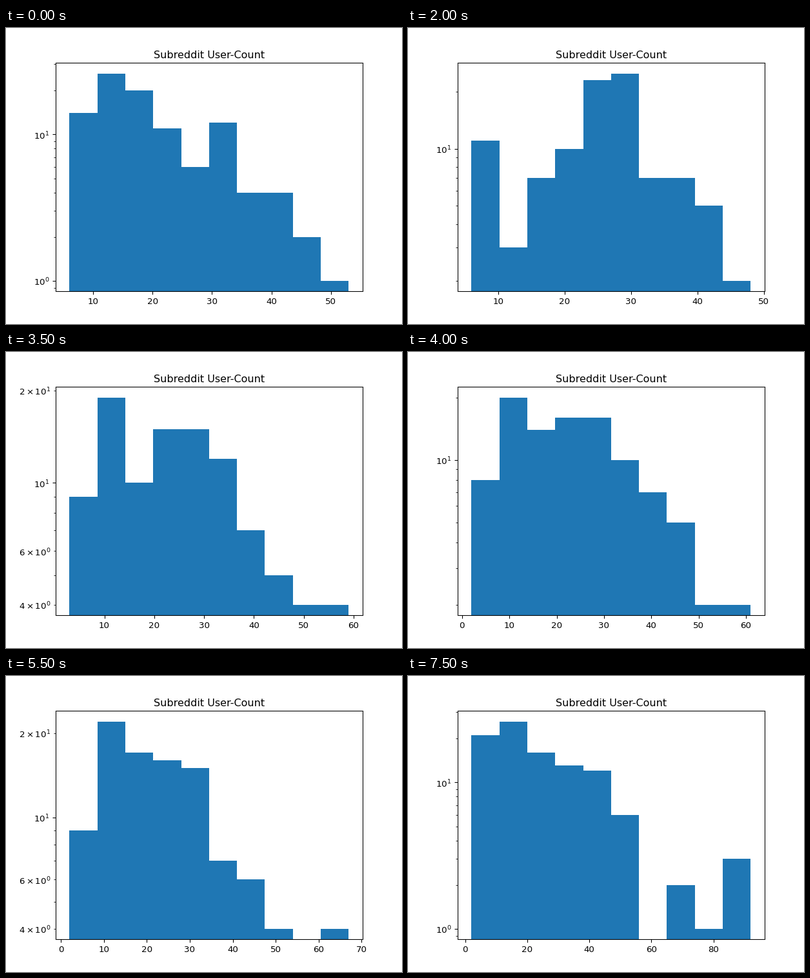
Recreate the animation shown at these times as a matplotlib script. Size 614 px wide and 460 px high, loop 8000 ms.

```python
import numpy as np
import matplotlib.pyplot as plt
from matplotlib.animation import FuncAnimation
from matplotlib.transforms import Affine2D

W, H, DPI = 614, 460, 96
STEPS, INTERVAL = 16, 500
TOTAL = 100  # every histogram counts this many subreddits

# key poses, step: (lowest value, highest value, counts of all bins but the last)
POSES = {
    0: (6, 53, 14, 26, 20, 11, 6, 12, 4, 4, 2),
    2: (4, 47, 6, 4, 14, 21, 14, 15, 13, 7, 1),
    4: (6, 48, 11, 3, 7, 10, 23, 25, 7, 7, 5),
    7: (3, 59, 9, 19, 10, 15, 15, 12, 7, 5, 4),
    9: (2, 63, 7, 20, 17, 16, 17, 9, 7, 5, 0),
    13: (3, 71, 11, 25, 17, 17, 13, 5, 5, 3, 0),
    15: (2, 92, 21, 26, 16, 13, 12, 6, 0, 2, 1),
}


def histogram(step):
    """Return bin edges and counts, blended between the nearest poses."""
    low, high, *counts = (round(np.interp(step, list(POSES), track))
                          for track in zip(*POSES.values()))
    counts.append(TOTAL - sum(counts))
    return np.linspace(low, high, len(counts) + 1), counts


fig, ax = plt.subplots(figsize=(W / DPI, H / DPI), dpi=DPI)
# default margins of a 6.4 x 4.8 inch figure, which is a fraction larger
full_w, full_h = 6.4 * DPI, 4.8 * DPI
fig.subplots_adjust(left=0.125 * full_w / W, right=0.9 * full_w / W,
                    bottom=0.11 * full_h / H, top=0.88 * full_h / H)
text_shift = Affine2D().translate(0, H - full_h)


def draw(step):
    edges, counts = histogram(step)
    ax.clear()
    ax.hist((edges[:-1] + edges[1:]) / 2, bins=edges, weights=counts, log=True)
    title = ax.set_title("Subreddit User-Count")
    labels = ax.get_xticklabels() + ax.get_yticklabels(which="both")
    for text in [title, *labels]:
        text.set_transform(text.get_transform() + text_shift)


anim = FuncAnimation(fig, draw, frames=STEPS, interval=INTERVAL,
                     init_func=lambda: draw(0), repeat=True, repeat_delay=0)
plt.show()
```
